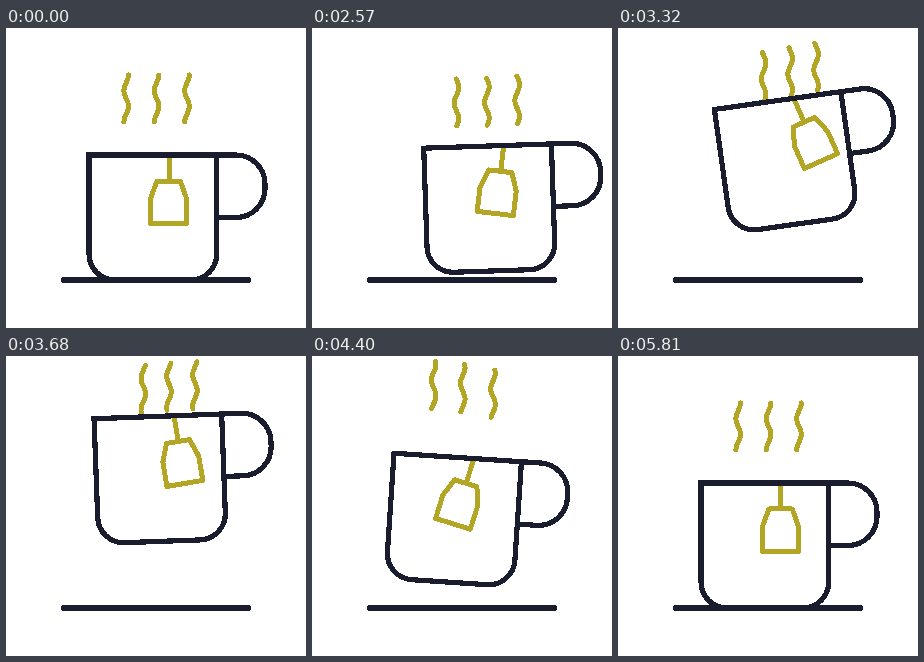
Recreate the animation shown at these times as an HTML page. Size 300 by 300 pixels, loop 5840 ms.

```html
<!DOCTYPE html>
<html lang="en">
<head>
<meta charset="utf-8">
<title>Tea cup</title>
<style>
  html, body { margin: 0; width: 100%; height: 100%; overflow: hidden; background: #fff; }
  svg { display: block; width: 100vw; height: 100vh; shape-rendering: crispEdges; }
  path { fill: none; stroke-linecap: round; }
  .dark { stroke: #1a1d2e; stroke-width: 5.2; }
  .gold { stroke: #b4a625; stroke-width: 5; stroke-linejoin: round; }
  #ground { stroke-width: 6; }
</style>
</head>
<body>
<svg viewBox="0 0 300 300">
  <path id="ground" class="dark" d="M58 252H242.5"/>
  <path class="plume gold"/>
  <path class="plume gold"/>
  <path class="plume gold"/>
  <g id="cup">
    <path id="bag" class="gold" d="M163 128V153M151 153H174.3L180.7 171V195.5H144.3V171Z"/>
    <path class="dark" d="M83 127H210.7V226A26 26 0 0 1 184.7 252H109A26 26 0 0 1 83 226Z"/>
    <path class="dark" d="M211 127H230A29 29 0 0 1 259 156V160.5A29 29 0 0 1 230 189.5H211"/>
  </g>
</svg>
<script>
const LOOP = 5840, START = 2030, STEP = 30;
const cup = document.getElementById('cup');
const bag = document.getElementById('bag');
const plumes = document.querySelectorAll('.plume');

const progress = (t, from, to) => Math.min(1, Math.max(0, (t - from) / (to - from)));
const ease = (t, from, to) => (1 - Math.cos(Math.PI * progress(t, from, to))) / 2;

// Sum of eased moves, each given as [from, to, amount]
const travel = (t, ...moves) =>
  moves.reduce((sum, [from, to, amount]) => sum + amount * ease(t, from, to), 0);

function drawCup(t) {
  const x = travel(t, [2000, 2800, 38], [2600, 4300, -43.5], [4300, 5000, 5.5]);
  const y = travel(t, [2200, 3750, -67], [3750, 4880, 67]);
  const tilt = travel(t, [2250, 3250, -8.2], [3250, 4150, 13.1], [4150, 4950, -4.9]);
  const swing = travel(t, [2000, 2500, 9], [2500, 3300, -25], [3300, 4350, 29.5],
    [4480, 5250, -21.5], [5250, 5570, 10], [5570, 5830, -2]);
  cup.setAttribute('transform', `translate(${x} ${y}) rotate(${tilt} 147 189)`);
  bag.setAttribute('transform', `rotate(${swing} 163 127)`);
}

// The plumes follow the cup, the right one first, while a wave runs up through them
function drawPlume(node, i, t) {
  const lag = 1 - i;
  const x = 120.2 + 30.4 * i
    + travel(t, [2000, 2800, 30], [2680 + 180 * lag, 4480 + 180 * lag, -30]);
  const y = 47 + travel(t, [2000, 2500, 4],
    [2450 + 95 * lag, 3850 + 95 * lag, -45.5], [4150 + 250 * lag, 5550, 41.5]);
  const phase = 8 * Math.PI * (1 - (1 - progress(t, 2000, 5550)) ** 1.15);
  const points = Array.from({ length: 25 }, (_, n) => {
    const s = n / 24;
    return `${x + 2.3 * Math.cos(3 * Math.PI * s + phase)} ${y + 47 * s}`;
  });
  node.setAttribute('d', 'M' + points.join('L'));
}

const begin = performance.now();
function tick() {
  const time = (performance.now() - begin) % LOOP;
  const t = time < START ? 0 : START + Math.floor((time - START) / STEP) * STEP;
  drawCup(t);
  plumes.forEach((node, i) => drawPlume(node, i, t));
  requestAnimationFrame(tick);
}
tick();
</script>
</body>
</html>
```
